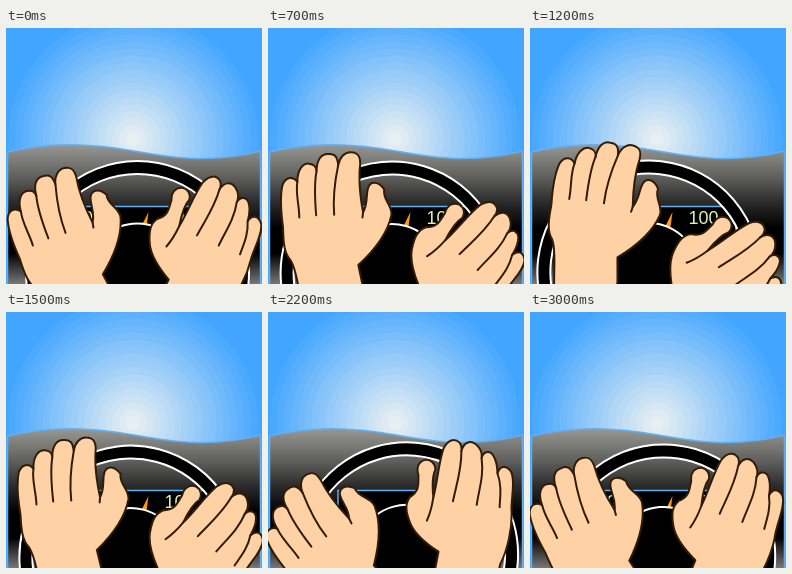
Recreate the animation shown at these times as an HTML page with a canvas. Size 256 px wide and 256 px high, loop 3.1 s.

```html
<!DOCTYPE html>
<html>
<head>
<meta charset="utf-8">
<title>Steering wheel</title>
<style>
  html, body { margin: 0; width: 100%; height: 100%; overflow: hidden; }
  canvas { display: block; }
</style>
</head>
<body>
<canvas id="stage" width="256" height="256"></canvas>
<script>
const ctx = document.getElementById('stage').getContext('2d');
const LOOP = 3100, STEP = 100;
const PIVOT = { x: 126, y: 219 };
const SKIN = '#ffd2a6', INK = '#331c06', BLUE = '#62b0f4';

// time in ms, wheel angle in degrees
const turns = [[0, 0], [1200, 28], [2500, -30], [3100, 0]];

// Each hand is drawn in the pose it has at its own rest angle.
const leftHand = {
  rest: 21,
  outline: new Path2D(`M34 310 L28 256 C27 245 26 232 22 224 C16 217 16 206 17 190
    C16 172 17 157 20 148 C24 140 31 140 35 146
    C36 134 42 128 48 129 C53 130 55 132 55 137
    C56 126 61 120 68 121 C75 121 77 125 77 133
    C79 125 85 120 91 121 C98 122 100 126 99 134
    C96 149 96 163 98 182 C104 173 102 165 105 158
    C108 151 116 152 121 161 C118 171 128 177 126 187
    C121 204 107 220 89 234 L92 258 L92 310 Z`),
  creases: new Path2D(`M35 146 C32 158 35 169 34 182 M55 137 C51 151 51 166 51 181
    M77 133 C72 150 69 166 69 182 M98 182 L97 187`)
};
const rightHand = {
  rest: -25,
  outline: new Path2D(`M170 310 L172 258 L173 233 C158 226 147 219 141 209
    C134 197 133 190 137 183 C146 175 143 169 142 160
    C138 152 141 146 147 144 C152 143 157 146 158 152
    C156 158 157 168 160 180 C162 164 160 145 163 130
    C166 121 172 118 178 122 C180 124 181 126 181 130
    C182 121 188 118 194 121 C199 124 202 129 202 134
    C203 126 210 125 214 131 C218 136 219 141 220 147
    C221 139 227 137 233 143 C239 151 237 167 239 180
    C243 199 241 221 236 236 L234 258 L234 310 Z`),
  creases: new Path2D(`M181 130 C184 148 181 164 180 181 M202 134 C207 151 204 165 204 181
    M220 147 C226 158 226 169 227 180 M160 180 C160 189 159 197 157 204`)
};

function angleAt(time) {
  const i = turns.findIndex(([end]) => time < end);
  const [t0, a0] = turns[i - 1], [t1, a1] = turns[i];
  return a0 + (a1 - a0) * (time - t0) / (t1 - t0);
}

function turned(degrees, draw) {
  ctx.save();
  ctx.translate(PIVOT.x, PIVOT.y);
  ctx.rotate(degrees * Math.PI / 180);
  ctx.translate(-PIVOT.x, -PIVOT.y);
  draw();
  ctx.restore();
}

function circle(x, y, r) {
  ctx.beginPath();
  ctx.arc(x, y, r, 0, Math.PI * 2);
}

function drawSky() {
  const outer = [66, 165, 255], inner = [232, 239, 242], bands = 18;
  ctx.fillStyle = `rgb(${outer})`;
  ctx.fillRect(0, 0, 256, 256);
  for (let i = 1; i <= bands; i++) {
    const mix = outer.map((c, k) => Math.round(c + (inner[k] - c) * i / bands));
    ctx.fillStyle = `rgb(${mix})`;
    circle(127, 111, 125 * (1 - (i - 1) / bands));
    ctx.fill();
  }
}

function drawDash() {
  const shade = ctx.createLinearGradient(0, 116, 0, 256);
  shade.addColorStop(0, '#989894');
  shade.addColorStop(0.24, '#5e5e5c');
  shade.addColorStop(0.4, '#2f2f2f');
  shade.addColorStop(0.6, '#000');
  shade.addColorStop(0.78, '#000');
  shade.addColorStop(1, '#777');
  ctx.beginPath();
  ctx.moveTo(1.5, 258);
  ctx.lineTo(1.5, 124);
  ctx.bezierCurveTo(45, 114, 82, 115, 128, 123);
  ctx.bezierCurveTo(172, 131, 208, 135, 254.5, 123);
  ctx.lineTo(254.5, 258);
  ctx.closePath();
  ctx.fillStyle = shade;
  ctx.fill();
  ctx.strokeStyle = BLUE;
  ctx.lineWidth = 1.5;
  ctx.stroke();
}

function drawPanel() {
  ctx.fillStyle = '#000';
  ctx.fillRect(70, 178, 136, 80);
  ctx.strokeStyle = BLUE;
  ctx.lineWidth = 1.5;
  ctx.strokeRect(70, 178.5, 136, 80);
  ctx.fillStyle = '#ddf3ae';
  ctx.font = '18px "Liberation Sans", Arial, sans-serif';
  ctx.fillText('0', 77, 196);
  ctx.fillText('100', 158.5, 196);

  ctx.fillStyle = '#ff9a18';
  ctx.beginPath();
  ctx.moveTo(142.5, 184);
  ctx.lineTo(140.5, 199);
  ctx.lineTo(135.5, 198);
  ctx.fill();
}

function drawWheel() {
  const x = 131.5, y = 244.5;
  ctx.strokeStyle = '#000';
  ctx.lineWidth = 12;
  circle(x, y, 105);
  ctx.stroke();
  ctx.strokeStyle = '#fff';
  ctx.lineWidth = 2;
  for (const r of [111.5, 98.5]) {
    circle(x, y, r);
    ctx.stroke();
  }
  circle(x, y, 49);
  ctx.fillStyle = '#000';
  ctx.fill();
  ctx.stroke();
}

function drawHand(hand, angle) {
  turned(angle - hand.rest, () => {
    ctx.fillStyle = SKIN;
    ctx.strokeStyle = INK;
    ctx.lineWidth = 2;
    ctx.lineCap = ctx.lineJoin = 'round';
    ctx.fill(hand.outline);
    ctx.stroke(hand.outline);
    ctx.stroke(hand.creases);
  });
}

function frame() {
  const time = Math.floor(performance.now() % LOOP / STEP) * STEP;
  const angle = angleAt(time);
  drawSky();
  drawDash();
  drawPanel();
  turned(angle, drawWheel);
  drawHand(leftHand, angle);
  drawHand(rightHand, angle);
  requestAnimationFrame(frame);
}
frame();
</script>
</body>
</html>
```
